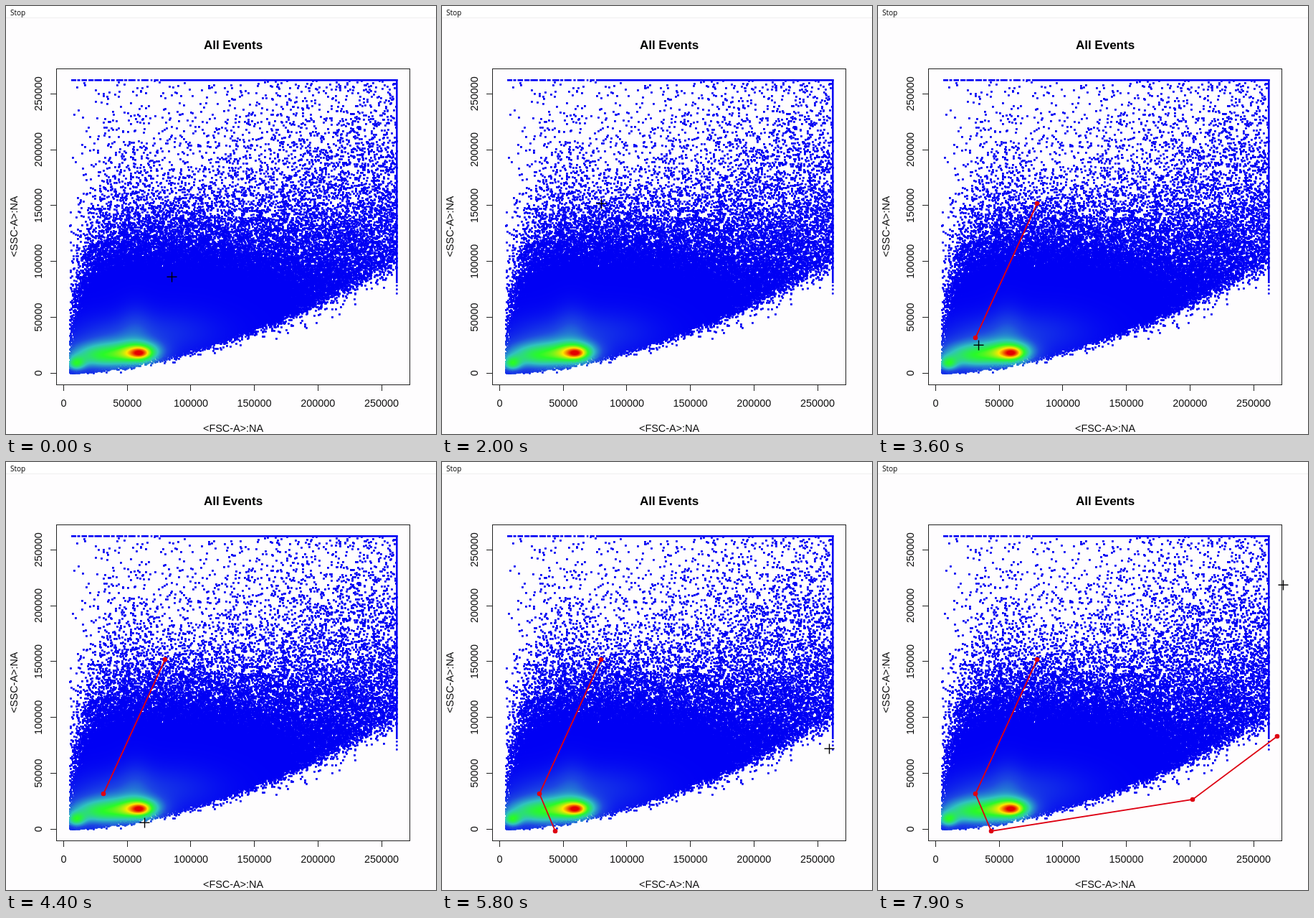
These frames come from a looping animation (600x596 px, 8 s). An HTML page with a canvas:

```html
<!DOCTYPE html>
<html lang="en">
<head>
<meta charset="utf-8">
<title>All Events</title>
<style>
  html, body { margin: 0; width: 100%; height: 100%; overflow: hidden; background: #fefdfe; }
  canvas { display: block; }
</style>
</head>
<body>
<canvas id="stage" width="600" height="596"></canvas>
<script>
const W = 600, H = 596, LOOP = 8000;
const PAPER = '#fefdfe', BLUE = '#0000f4', RED = '#de0012', INK = '#111';
const SANS = '"Liberation Sans", Arial, sans-serif';

let seed = 20117;
function random() {
  seed = (seed + 0x6D2B79F5) | 0;
  let r = Math.imul(seed ^ (seed >>> 15), 1 | seed);
  r = (r + Math.imul(r ^ (r >>> 7), 61 | r)) ^ r;
  return ((r ^ (r >>> 14)) >>> 0) / 4294967296;
}

const mix = (a, b, f) => a + (b - a) * f;
const ramp = (x, from, to) => Math.min(1, Math.max(0, (x - from) / (to - from)));

// Mean number of dots over a point: exponential towards the bottom,
// thin at the left, cut off below by a rising, softening border
function crowd(x, y) {
  const u = x - 88;
  const right = ramp(x, 300, 500);
  const left = 1.03 - Math.exp(-(((x - 84) / 45) ** 2));
  const rise = Math.exp((y - 296) / mix(42, 88, right));
  const depth = Math.min(9, left * (mix(.06, .09, right) + rise));
  const edge = 511 - 86 * (u / 312) ** 1.54;
  return depth / (1 + Math.exp((y - edge) / (.8 + u / 90)));
}

// Density hills: height, x, y, spread x, spread y
const HILLS = [
  [.5, 187, 483, 20, 10],   // main population
  [.22, 187, 484, 9, 5],    // its core
  [.46, 135, 488, 38, 13],  // bridge
  [.36, 97, 499, 9, 7],     // small population
  [.18, 150, 468, 45, 22],  // halo
  [.08, 180, 445, 16, 22],  // plume
  [.1, 230, 455, 50, 22]    // wide tail
];

function density(x, y) {
  return HILLS.reduce((v, [h, cx, cy, sx, sy]) =>
    v + h * Math.exp(-.5 * (((x - cx) / sx) ** 2 + ((y - cy) / sy) ** 2)), 0);
}

// Evenly spaced colour stops
const HEAT = [[0, 0, 244], [28, 70, 226], [48, 195, 190], [40, 250, 40], [255, 232, 0], [228, 0, 0]];

function heat(v) {
  const s = ramp(v, 0, 1) * (HEAT.length - 1);
  const i = Math.min(Math.floor(s), HEAT.length - 2);
  return `rgb(${HEAT[i].map((c, k) => Math.round(mix(c, HEAT[i + 1][k], s - i))).join()})`;
}

function drawCloud(g) {
  const size = 2.8;
  for (let x = 88; x <= 544; x++) {
    for (let y = 104; y <= 511; y++) {
      if (random() > crowd(x, y) / (size * size)) continue;
      g.fillStyle = heat(density(x, y));
      g.fillRect(x, y - 1, size, size);
    }
  }
}

// Events piled up at the range limits
function drawLimits(g) {
  g.fillStyle = BLUE;
  g.fillRect(91, 102, 455.5, 2.6);
  g.fillRect(544, 102, 2.6, 284);
  for (let y = 388; y < 404; y += 4 + 6 * random()) g.fillRect(544, y, 2.6, 2.6);
  g.fillStyle = PAPER;
  for (let x = 98; x < 217; x += 4 + 9 * random()) g.fillRect(x, 101, 1 + 2 * random(), 4);
}

function label(g, text, x, y, font, turn = 0) {
  g.save();
  g.translate(x, y);
  g.rotate(turn);
  g.font = font;
  g.fillText(text, 0, 0);
  g.restore();
}

function drawAxes(g) {
  const small = '14.4px ' + SANS, up = -Math.PI / 2;
  g.strokeStyle = '#222';
  g.lineWidth = 1;
  g.strokeRect(70.5, 87.5, 493, 440);
  g.fillStyle = INK;
  g.textAlign = 'center';
  g.beginPath();
  for (let i = 0; i <= 5; i++) {
    const x = 80.5 + i * 88.7, y = 511.3 - i * 77.8;
    const px = Math.floor(x) + .5, py = Math.floor(y) + .5;
    g.moveTo(px, 527);
    g.lineTo(px, 536);
    g.moveTo(70, py);
    g.lineTo(62, py);
    label(g, String(i * 50000), x, 558, small);
    label(g, String(i * 50000), 50, y, small, up);
  }
  g.stroke();
  label(g, '<FSC-A>:NA', 317, 592.5, small);
  label(g, '<SSC-A>:NA', 16, 307, small, up);
  g.fillStyle = '#000';
  label(g, 'All Events', 317, 59.5, 'bold 17px ' + SANS);
}

function drawMenu(g) {
  g.fillStyle = '#fff';
  g.fillRect(0, 0, W, 16);
  g.fillStyle = '#efeff0';
  g.fillRect(0, 16, W, 1);
  g.fillStyle = '#000';
  g.textAlign = 'left';
  label(g, 'Stop', 6, 12.5, '10px "Open Sans", sans-serif');
}

function drawBackdrop() {
  const c = document.createElement('canvas');
  c.width = W;
  c.height = H;
  const g = c.getContext('2d');
  g.fillStyle = PAPER;
  g.fillRect(0, 0, W, H);
  drawMenu(g);
  drawCloud(g);
  drawLimits(g);
  drawAxes(g);
  return c;
}

// Gate corners, and the time each one shows up after its click
const GATE = [[222, 275], [136, 462], [158, 514], [439, 470], [557, 382]];
const SHOWN = [2300, 3500, 4600, 5900, 6600];

// Cursor stops: time, position
const PATH = [
  [0, [231, 377]], [300, [231, 377]], [1400, [230, 277]],
  [1700, GATE[0]], [2000, GATE[0]], [2700, [147, 455]],
  [3000, GATE[1]], [3500, GATE[1]], [4000, GATE[2]], [4400, [193, 502]],
  [5200, GATE[3]], [5800, [540, 399]], [6100, GATE[4]],
  [6800, [567, 373]], [7900, [565, 171]]
];

function cursorAt(t) {
  const i = Math.max(1, PATH.findIndex(stop => stop[0] >= t));
  const [t0, a] = PATH[i - 1], [t1, b] = PATH[i];
  return a.map((c, k) => Math.round(mix(c, b[k], ramp(t, t0, t1))));
}

const g = document.getElementById('stage').getContext('2d');
const backdrop = drawBackdrop();

function drawGate(t) {
  const corners = GATE.filter((_, i) => t >= SHOWN[i]);
  g.strokeStyle = g.fillStyle = RED;
  g.lineWidth = 1.8;
  g.beginPath();
  for (const [x, y] of corners) g.lineTo(x, y);
  g.stroke();
  for (const [x, y] of corners) {
    g.beginPath();
    g.arc(x, y, 3.3, 0, 2 * Math.PI);
    g.fill();
  }
}

function drawCursor(t) {
  const [x, y] = cursorAt(t);
  g.fillStyle = '#000';
  g.fillRect(x - 6.5, y - .5, 14, 1.4);
  g.fillRect(x - .2, y - 6.5, 1.4, 14);
}

function frame(now) {
  const t = Math.floor(now % LOOP / 100) * 100;
  g.drawImage(backdrop, 0, 0);
  drawGate(t);
  drawCursor(t);
  requestAnimationFrame(frame);
}
frame(performance.now());
</script>
</body>
</html>
```
